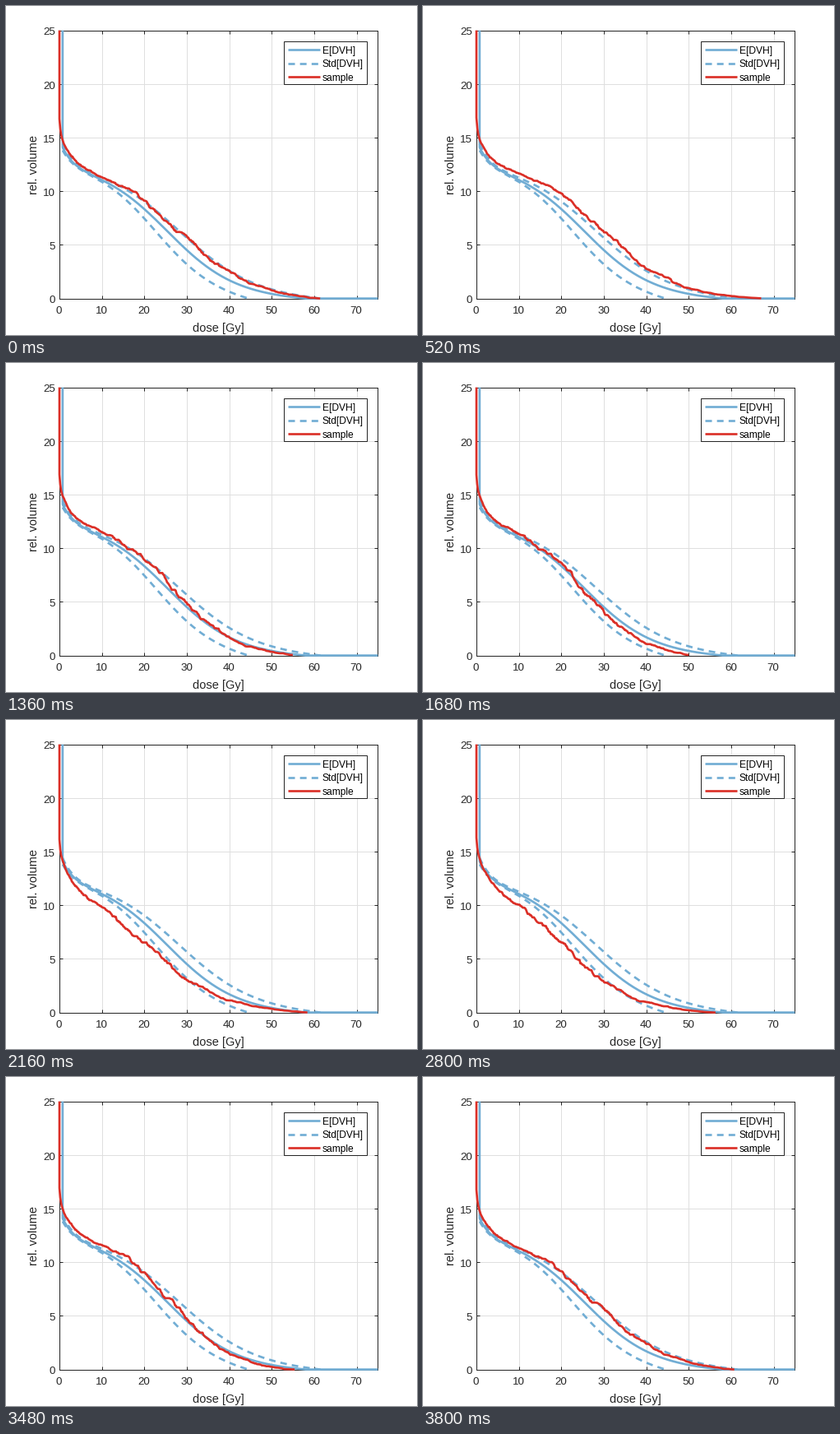
These frames come from a looping animation (500x400 px, 3.84 s). A matplotlib script:

```python
import matplotlib.pyplot as plt
import numpy as np
from matplotlib.animation import FuncAnimation

W, H, DPI = 500, 400, 100
FRAMES, STEP = 96, 40
LOOP = FRAMES * STEP
BLUE, RED, INK = "#71add4", "#db2f27", "#262626"
PT = 72 / DPI                    # points per pixel
LINE = 2.67 * PT
DASH = (0, (3.0, 2.3))

# Time in ms, dose at half height, slope width, largest dose
POSES = np.array([
    (0, 28.2, 8.6, 61.4),
    (560, 30.2, 8.4, 67.5),
    (1040, 28.4, 7.6, 59.9),
    (1680, 24.8, 7.0, 50.0),
    (2160, 20.5, 8.6, 58.4),
    (2800, 20.5, 8.0, 56.3),
    (3480, 26.6, 7.0, 55.4),
])


def dvh(dose, mid, width, end, spike):
    """Logistic fall with a low-dose spike, tapered to zero at end."""
    fall = 12.6 / (1 + np.exp((dose - mid) / width))
    taper = np.clip(1 - (np.abs(dose) / end) ** 10, 0, 1)
    return (fall + spike * np.exp(-dose / 2.7)) * taper


rng = np.random.default_rng(4)
POINTS = 300


def noise(span, scale):
    return scale * np.convolve(rng.normal(size=POINTS),
                               np.ones(span) / span, mode="same")


# Two texture layers that trade places around the loop
texture = [noise(22, 1.6) + noise(4, 0.45) for _ in range(2)]


def sample(ms):
    mid, width, tip = (np.interp(ms, POSES[:, 0], col, period=LOOP)
                       for col in POSES.T[1:])
    dose = np.linspace(0, tip, POINTS)
    a = 2 * np.pi * ms / LOOP
    shift = np.cos(a) * texture[0] + np.sin(a) * texture[1]
    shift *= np.clip(dose / 6, 0, 1)
    vol = dvh(dose + shift, mid, width, tip, 3.5) + 1.1 * np.exp(-dose / 0.2)
    vol = np.minimum.accumulate(vol)
    return np.append(0, dose), np.append(25, vol)


plt.rcParams["font.family"] = "Liberation Sans"
fig = plt.figure(figsize=(W / DPI, H / DPI), dpi=DPI, facecolor="white")
ax = fig.add_axes([65 / W, 44.4 / H, 387.4 / W, 326 / H])
ax.set(xlim=(0, 75), ylim=(0, 25), xticks=range(0, 71, 10),
       yticks=range(0, 26, 5))
ax.set_axisbelow(True)
ax.grid(color="#dfdfdf", linewidth=PT)
ax.tick_params(direction="in", length=4 * PT, width=PT, color=INK, top=True,
               right=True, labelbottom=False, labelleft=False)
for spine in ax.spines.values():
    spine.set(color=INK, linewidth=PT, zorder=1.5)


def label(x, y, text, size, **kw):
    kw.setdefault("color", INK)
    fig.text(x / W, 1 - y / H, text, fontsize=size * PT, **kw)


for gy in range(0, 71, 10):
    label(64.6 + gy * 387.4 / 75, 374.4, str(gy), 13.33, ha="center")
for vol in range(0, 26, 5):
    label(60.2, 361.4 - vol * 13.04, str(vol), 13.33, ha="right")
label(258.2, 396, "dose [Gy]", 14.67, ha="center")
label(34, 193, "rel. volume", 14.67, ha="center", va="center", rotation=90)

style = dict(linewidth=LINE, clip_on=False, solid_capstyle="butt",
             dash_capstyle="butt", solid_joinstyle="round", zorder=3)


def band(end, mid, width, spike, **kw):
    dose = np.linspace(0.75, end, 200)
    return dose, dvh(dose, mid, width, end, spike)


dose, vol = band(58, 25.35, 8, 2.7)
ax.plot([0.75, *dose, 75], [25, *vol, 0], color=BLUE, **style)
for edge in (band(61.5, 28.2, 8.8, 3.1), band(44.5, 22.6, 7, 2.3)):
    ax.plot(*edge, color=BLUE, linestyle=DASH, **style)
curve, = ax.plot([], [], color=RED, **style)

# Legend in pixel coordinates
key = fig.add_axes([0, 0, 1, 1])
key.set(xlim=(0, W), ylim=(H, 0))
key.axis("off")
key.add_patch(plt.Rectangle((337.6, 42.6), 101, 52, facecolor="white",
                            edgecolor=INK, linewidth=PT))
rows = [("E[DVH]", BLUE, "-"), ("Std[DVH]", BLUE, DASH), ("sample", RED, "-")]
for i, (text, color, dash) in enumerate(rows):
    y = 53 + 16.7 * i
    key.plot([342.5, 382], [y, y], color=color, linestyle=dash, **style)
    label(385, y + 4.6, text, 12, color="black")


def update(i):
    curve.set_data(*sample(i % FRAMES * STEP))
    return curve,


anim = FuncAnimation(fig, update, frames=FRAMES, interval=STEP, repeat=True,
                     repeat_delay=0, blit=False)
plt.show()
```
